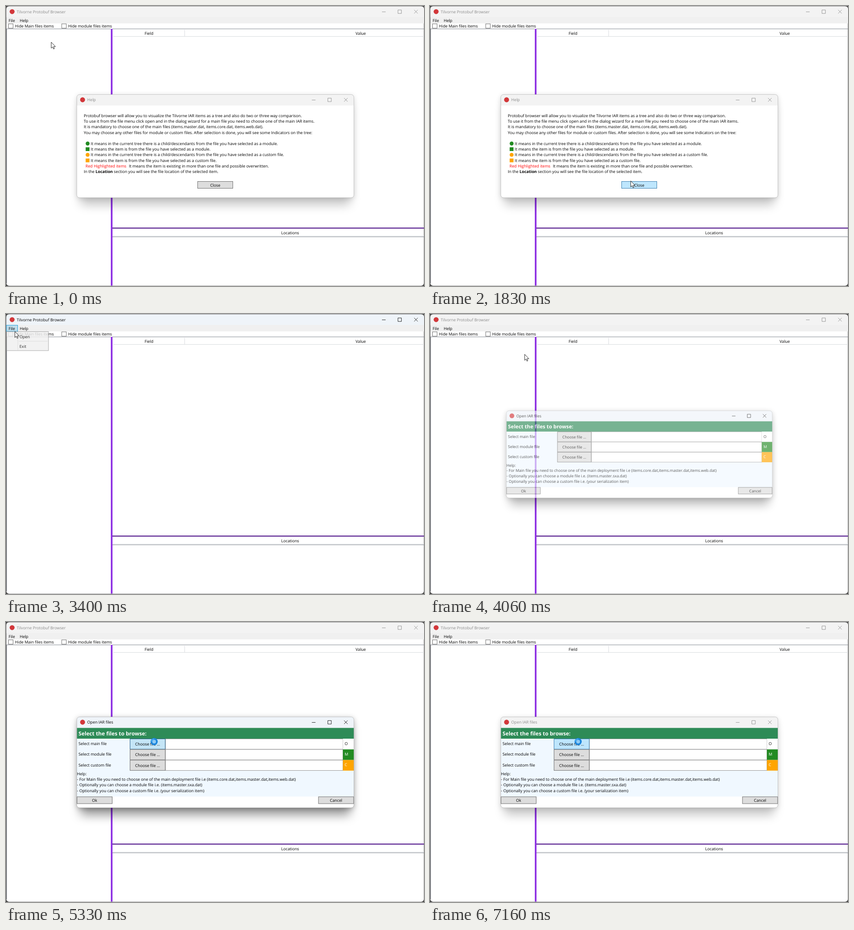
Write an HTML page that moves like this. It is 915x612 px and loops after 8 s.

```html
<!DOCTYPE html>
<html lang="en">
<head>
<meta charset="utf-8">
<title>Tilvorne Protobuf Browser</title>
<style>
html, body { margin: 0; width: 100%; height: 100%; overflow: hidden; background: #444; }
svg { display: block; width: 915px; height: 612px; }
text { font: 8.75px "Open Sans", "Noto Sans", sans-serif; text-rendering: geometricPrecision; white-space: pre; }
.mid { text-anchor: middle; }
.bold { font-weight: 700; }
.head { font-size: 11.7px; font-weight: 700; fill: #fff; }
.bar { fill: #f3f3f3; }
.name { fill: #8a8a8a; }
.ctl { fill: none; stroke: #8f8f8f; stroke-width: .9; }
.lit .bar { fill: #eff4f9; }
.lit .name { fill: #000; }
.keys .ctl { stroke: #111; }
.btn rect { fill: #ddd; stroke: #707070; }
.btn.hover rect { fill: #bee6fd; stroke: #3c7fb1; }
.btn.down rect { fill: #c4e5f6; stroke: #2c628b; }
.hot { fill: #26a0da3d; stroke: #26a0da; }
</style>
</head>
<body>
<svg id="stage" viewBox="0 0 915 612"></svg>
<script>
const text = (x, y, s, cls = '', fill = '#000') =>
  `<text x="${x}" y="${y}" class="${cls}"${cls == 'name' || cls == 'head' ? '' : ` fill="${fill}"`}>${s}</text>`;
const rect = (x, y, w, h, fill, more = '') =>
  `<rect x="${x}" y="${y}" width="${w}" height="${h}" fill="${fill}" ${more}/>`;
const dot = (x, y, r, fill) => `<circle cx="${x}" cy="${y}" r="${r}" fill="${fill}"/>`;
const line = (d, color) => `<path d="${d}" fill="none" stroke="${color}"/>`;
const button = (x, y, w, h, s, id = '') =>
  `<g class="btn" ${id && `id="${id}"`}>${rect(x, y, w, h, '#ddd')}${text(x + w / 2, y + h / 2 + 3.5, s, 'mid')}</g>`;

// Title bar with icon, name and the three window controls
function titleBar(x, y, w, name) {
  const r = x + w, m = y + 11.5;
  return `<path class="bar" d="M${x} ${y + 24}V${y + 6}q0-6 6-6H${r - 6}q6 0 6 6V${y + 24}Z"/>` +
    dot(x + 12.6, m, 5.4, '#d2373a') + text(x + 22.8, m + 3.4, name, 'name') +
    `<path class="ctl" d="M${r - 92} ${m + .5}h8M${r - 57} ${m - 3.6}h7.6v7.6h-7.6ZM${r - 21.5} ${m - 3.8}l7.8 7.8m0-7.8l-7.8 7.8"/>`;
}

function dialog(id, y, h, name, body) {
  const x = 155, w = 606.5;
  return `<g id="${id}"><g class="shade">
    ${rect(x, y + 2, w, h, '#0004', 'rx="6" filter="url(#soft)"')}
    ${rect(x + 8, y + 20, w - 16, h - 4, '#0006', 'rx="6" filter="url(#wide)"')}</g>
    ${rect(x, y, w, h, '#fff', 'rx="6"')}${titleBar(x, y, w, name)}${body}
    ${rect(x, y, w, h, 'none', 'rx="6" stroke="#8888" stroke-width=".8"')}</g>`;
}

const row = i => 242.8 + 12.3 * i;
const green = '#228b22', orange = '#ffa500';

const main = `<g id="main">${rect(.8, .8, 913.8, 610.6, '#fff', 'rx="6"')}
  ${titleBar(.8, .8, 914.2, 'Tilvorne Protobuf Browser')}
  ${rect(1, 24, 914, 14, '#f0f0f0')}
  <g id="fileHot">${rect(1, 24.5, 24.5, 13.5, '', 'class="hot"')}</g>
  ${text(5.8, 34.8, 'File')}${text(30, 34.8, 'Help')}
  ${[[5.5, 'Hide Main files items'], [122, 'Hide module files items']].map(([x, s]) =>
    rect(x, 39, 10, 9.5, '#fff', 'stroke="#606060" stroke-width=".9"') + text(x + 14, 47.2, s)).join('')}
  ${line('M1 50H229M1.5 50V606M233 50H915', '#828790')}
  ${line('M235 66.5H915M391 52V66', '#d8dbde')}
  ${text(313, 62.5, 'Field', 'mid')}${text(776.5, 62.5, 'Value', 'mid')}
  ${rect(229.5, 50, 3.6, 561, '#8a2be2')}${rect(233, 484.2, 682, 2.5, '#663399')}
  ${line('M234 502.5H915', '#dde0e3')}${line('M233 504.5H915', '#828790')}
  ${text(622, 498.6, 'Locations', 'mid')}</g>`;

const menu = `<g id="menu">${rect(1.5, 38.5, 91.5, 41.5, '#f0f0f0', 'stroke="#999"')}
  ${line('M26 40V79M28 59.5H91', '#d7d7d7')}
  <g id="openHot">${rect(4, 40.5, 87, 17, '', 'class="hot"')}</g>
  ${text(29.7, 52.8, 'Open')}${text(29.5, 73.6, 'Exit')}</g>`;

const help = dialog('help', 193.5, 225.5, 'Help',
  ['Protobuf browser will allow you to visualize the Tilvorne IAR items as a tree and also do two or three way comparison.',
   'To use it from the file menu click open and in the dialog wizard for a main file you need to choose one of the main IAR items.',
   'It is mandatory to choose one of the main files (items.master.dat, items.core.dat, items.web.dat).',
   'You may choose any other files for module or custom files. After selection is done, you will see some Indicators on the tree:',
  ].map((s, i) => text(170.3, row(i), s)).join('') +
  [[green, 'module'], [orange, 'custom file']].map(([c, s], i) => {
    const y = row(5 + 2 * i) - .7;
    return dot(178.7, y - 3, 4.3, c) + rect(174.4, y + 5.2, 8.4, 8.2, c) +
      text(185.6, y, `It means in the current tree there is a child/descendants from the file you have selected as a ${s}.`) +
      text(185.6, y + 12.3, `It means the item is from the file you have selected as a ${s}.`);
  }).join('') +
  text(174, row(9) - .4, 'Red Highlighted items', '', '#f00') +
  text(269, row(9) - .4, 'It means the item is existing in more than one file and possible overwritten.') +
  text(170.3, row(10) - .4, 'In the <tspan class="bold">Location</tspan> section you will see the file location of the selected item.') +
  button(419.5, 383.5, 77, 15, 'Close', 'close'));

const open = dialog('open', 207.5, 198.5, 'Open IAR files',
  rect(155.3, 231.5, 606, 23.5, '#2e8b57') + text(158.8, 248, 'Select the files to browse:', 'head') +
  rect(155.3, 255, 606, 126.5, '#f0f8ff') +
  [['main', 'O', '#fff'], ['module', 'M', green], ['custom', 'C', orange]].map(([s, mark, c], i) => {
    const y = 255.5 + 23.2 * i;
    return text(158.8, y + 13.7, `Select ${s} file`) + rect(349, y, 388.5, 22.6, '#fff', 'stroke="#999"') +
      rect(737.5, y - .3, 23.8, 23.2, c) + text(741.3, y + 13.5, mark, '', i ? '#fff' : '#000') +
      button(271.5, y, 77, 22.5, 'Choose file ...', 'pick' + i);
  }).join('') +
  ['Help:',
   '- For Main file you need to choose one of the main deployment file i.e (items.core.dat,items.master.dat,items.web.dat)',
   '- Optionally you can choose a module file i.e. (items.master.sxa.dat)',
   '- Optionally you can choose a custom file i.e. (your serialization item)',
  ].map((s, i) => text(155.3, 334.8 + 12.3 * i, s)).join('') +
  button(155.5, 382, 77, 15, 'Ok') + button(684, 382, 77, 15, 'Cancel'));

const $ = id => document.getElementById(id);
$('stage').innerHTML = `<defs>
  <filter id="soft" x="-20%" y="-40%" width="140%" height="180%"><feGaussianBlur stdDeviation="6"/></filter>
  <filter id="wide" x="-20%" y="-40%" width="140%" height="180%"><feGaussianBlur stdDeviation="11"/></filter></defs>
  ${main}${menu}${help}${open}
  <path id="arrow" d="M0 0V13.2L3 10.5 5 15 7 14.2 5.1 9.8H9.3Z" fill="#fff" stroke="#111" stroke-width=".9"/>
  <g id="busy">${dot(324.3, 261.4, 7.8, '#1c86dd')}${dot(324.3, 261.4, 4, '#8fcbf5')}
  <path d="M318.6 261.4a5.7 5.7 0 0 1 5.7-5.7" fill="none" stroke="#45a8f0" stroke-width="2.5"/></g>`;

const smooth = p => p * p * (3 - 2 * p), slow = p => 1 - (1 - p) ** 2;
const ramp = (t, a, b) => Math.min(1, Math.max(0, (t - a) / (b - a)));
const within = (t, a, b) => t >= a && t < b;

// Pointer stops: time, x, y, easing towards that stop
const stops = [[0, 99, 79], [760, 16, 31], [980, 16, 31], [1000, 29, 47], [1800, 439, 382, slow],
  [1980, 444, 385], [2130, 444, 385], [2600, 12, 25], [2800, 12, 25], [3000, 16, 26], [3260, 16, 26],
  [3400, 18, 38], [3500, 89, 48, slow], [3860, 89, 48], [4200, 275, 111], [4500, 275, 111],
  [5060, 324, 257], [8000, 324, 257]];

function pointer(t) {
  const i = stops.findIndex(s => s[0] > t), [a, x, y] = stops[i - 1], [b, u, v, ease = smooth] = stops[i];
  const p = ease((t - a) / (b - a));
  return [x + (u - x) * p, y + (v - y) * p];
}

const show = (id, alpha) => {
  $(id).style.display = alpha > 0 ? '' : 'none';
  $(id).setAttribute('opacity', alpha);
};
const flag = (id, cls, on) => $(id).classList.toggle(cls, on);
const zoom = (id, k) => $(id).setAttribute('transform', `translate(458 306.7) scale(${k}) translate(-458 -306.7)`);
const shade = (id, a) => document.querySelector(`#${id} .shade`).setAttribute('opacity', a);
const light = (id, on, keys = on) => { flag(id, 'lit', on); flag(id, 'keys', keys); };

function draw(t) {
  light('main', within(t, 2160, 4000), within(t, 2100, 4000));
  show('fileHot', within(t, 2830, 3860) ? 1 : 0);
  show('menu', t < 3860 ? ramp(t, 3250, 3430) : 0);
  show('openHot', t >= 3430 ? 1 : 0);

  const shut = ramp(t, 1980, 2100);
  show('help', 1 - shut);
  zoom('help', 1 - .06 * shut);
  light('help', t >= 1860);
  shade('help', t < 1860 ? .55 : 1);
  flag('close', 'hover', t >= 1830);

  show('open', ramp(t, 3990, 4100));
  zoom('open', 1 - .1 * (1 - ramp(t, 4000, 4300)) ** 4);
  light('open', t < 5870);
  shade('open', 1 - .45 * ramp(t, 5860, 6100));
  flag('pick0', 'hover', t >= 5000);
  flag('pick0', 'down', within(t, 5300, 7160));

  show('arrow', t < 5330 ? 1 : 0);
  show('busy', t >= 5330 ? 1 : 0);
  $('arrow').setAttribute('transform', `translate(${pointer(t)})`);
}

const start = performance.now();
function tick() {
  draw((performance.now() - start) % 8000);
  requestAnimationFrame(tick);
}
tick();
</script>
</body>
</html>
```
